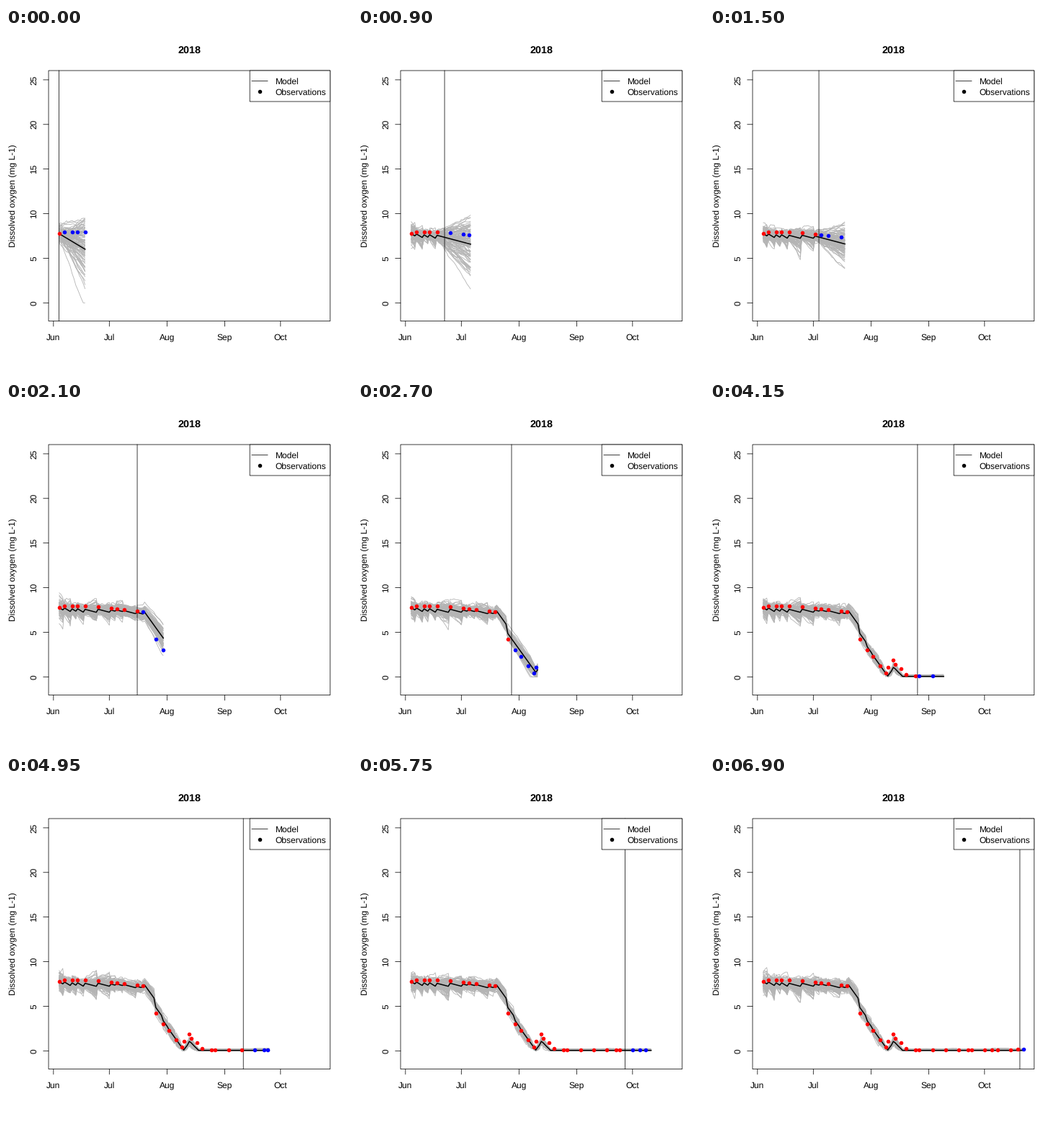
Recreate the animation shown at these times as a matplotlib script. Size 480x480 px, loop 6.95 s.

```python
import numpy as np
import matplotlib.pyplot as plt
from matplotlib.animation import FuncAnimation
from matplotlib.collections import LineCollection
from matplotlib.patches import Rectangle

PX = 0.72  # points per pixel at 100 dpi
FRAMES, STEP = 139, 50
START, LAST, HORIZON = 3, 143, 14
MEMBERS = 100
FLOOR = 0.05
LEFT, RIGHT, TOP, BOTTOM = 59.04, 449.76, 59.04, 406.56

plt.rcParams["font.family"] = "Liberation Sans"
plt.rcParams["text.hinting"] = "none"

# Weekly visits with one gap, a second weekly visit in the steep phase, some extras
VISITS = set(range(START, LAST + 1, 7)) - {52} | set(range(48, 70, 7))
VISITS |= {6, 13, 34, 70, 74, 77, 85, 113, 126, 140}
OBS_DAY = np.array(sorted(VISITS))
OBS_KEYS = [(3, 7.76), (6, 7.97), (24, 7.9), (48, 7.28), (55, 4.22), (59, 3.04), (69, 0.42),
            (70, 1.1), (73, 1.9), (74, 1.36), (77, 0.93), (80, 0.24), (85, 0.1),
            (136, 0.12), (143, 0.2)]
OBS = np.interp(OBS_DAY, *zip(*OBS_KEYS))
OBS_AT = dict(zip(OBS_DAY.tolist(), OBS))

# Daily change of the uncorrected model
DRIFT = np.zeros(LAST + 1)
for first, end, rate in [(3, 17, -0.125), (17, 48, -0.055), (48, 49, 0.2),
                         (49, 70, -0.29), (70, 73, 0.28), (73, 80, -0.22)]:
    DRIFT[first:end] = rate


def px_x(day):
    return 65.85 + 2.582 * np.asarray(day)


def px_y(value):
    return 381.3 - 12.376 * np.asarray(value)


def simulate(today, seed):
    """Days, mean run and ensemble, corrected at each observation up to today."""
    rng = np.random.default_rng(seed)
    days = np.arange(START, min(today + HORIZON, LAST) + 1)
    mean = np.empty(len(days))
    dev = np.empty((MEMBERS, len(days)))
    level = OBS_AT[START]
    for i, day in enumerate(days):
        if i:
            level = max(level + DRIFT[day - 1], FLOOR)
        if day <= today and day in OBS_AT:
            gain = 0.55 * min(level / 4, 1)
            level += gain * (OBS_AT[day] - level)
            dev[:, i] = rng.normal(0, 0.3 if i else 0.5, MEMBERS)
            z = rng.normal(size=MEMBERS)
            slope = 0.14 * np.exp(-day / 32) * (z - 0.07 * (z * z - 1))
        else:
            noise = 0.13 * np.exp(-day / 90)
            dev[:, i] = dev[:, i - 1] + slope + rng.normal(0, noise, MEMBERS)
        mean[i] = level
    scale = np.clip(0.2 + 0.6 * mean, 0, 1)
    return days, mean, np.maximum(mean + dev * scale, 0)


fig = plt.figure(figsize=(4.8, 4.8), dpi=100, facecolor="white")
ax = fig.add_axes([0, 0, 1, 1])
ax.set_xlim(0, 480)
ax.set_ylim(480, 0)
ax.axis("off")


def line(xs, ys, width=0.75, **kw):
    return ax.plot(xs, ys, color="black", lw=width * PX, snap=False, **kw)[0]


def box(x0, y0, x1, y1, z, fill="none"):
    ax.add_patch(Rectangle((x0, y0), x1 - x0, y1 - y0, fc=fill, ec="black",
                           lw=0.75 * PX, snap=False, zorder=z))


def label(x, y, text, size=12, **kw):
    opts = dict(ha="center", va="baseline", rotation_mode="anchor", zorder=8)
    opts.update(kw)
    ax.text(x, y, text, fontsize=size * PX, **opts)


def dots(color, xs=(), ys=(), z=5):
    return ax.plot(xs, ys, "o", color=color, ms=5.5 * PX, mew=0, snap=False, zorder=z)[0]


box(LEFT, TOP, RIGHT, BOTTOM, 6)
for day, month in [(0, "Jun"), (30, "Jul"), (61, "Aug"), (92, "Sep"), (122, "Oct")]:
    x = px_x(day)
    line([x, x], [BOTTOM, BOTTOM + 7.2])
    label(x, 433, month)
for value in range(0, 26, 5):
    y = px_y(value)
    line([LEFT - 7.2, LEFT], [y, y])
    label(42.2, y, str(value), rotation=90)
label(254.4, 35, "2018", 14.4, weight="bold")
label(13.2, 232.8, "Dissolved oxygen (mg L-1)", rotation=90)

box(338.2, TOP, RIGHT, 102, 7, "white")
line([341, 363], [73.4, 73.4], zorder=8)
dots("black", [352], [87.8], 8)
label(373.3, 78, "Model", ha="left")
label(373.3, 93, "Observations", ha="left")

ensemble = LineCollection([], colors="#b4b4b4", linewidths=0.85 * PX, zorder=2)
ax.add_collection(ensemble, autolim=False)
mean_line = line([], [], 1.5, zorder=3)
now_line = line([], [], zorder=4)
past, future = dots("red"), dots("blue")


def update(frame):
    today = START + frame
    days, mean, members = simulate(today, 100 + frame)
    xs = px_x(days)
    ensemble.set_segments([np.column_stack([xs, px_y(m)]) for m in members])
    mean_line.set_data(xs, px_y(mean))
    now = px_x(today)
    now_line.set_data([now, now], [TOP, BOTTOM])
    known = OBS_DAY <= today
    ahead = ~known & (OBS_DAY <= today + HORIZON)
    past.set_data(px_x(OBS_DAY[known]), px_y(OBS[known]))
    future.set_data(px_x(OBS_DAY[ahead]), px_y(OBS[ahead]))
    return ensemble, mean_line, now_line, past, future


anim = FuncAnimation(fig, update, frames=FRAMES, interval=STEP, repeat=True,
                     repeat_delay=0, blit=False)
plt.show()
```
